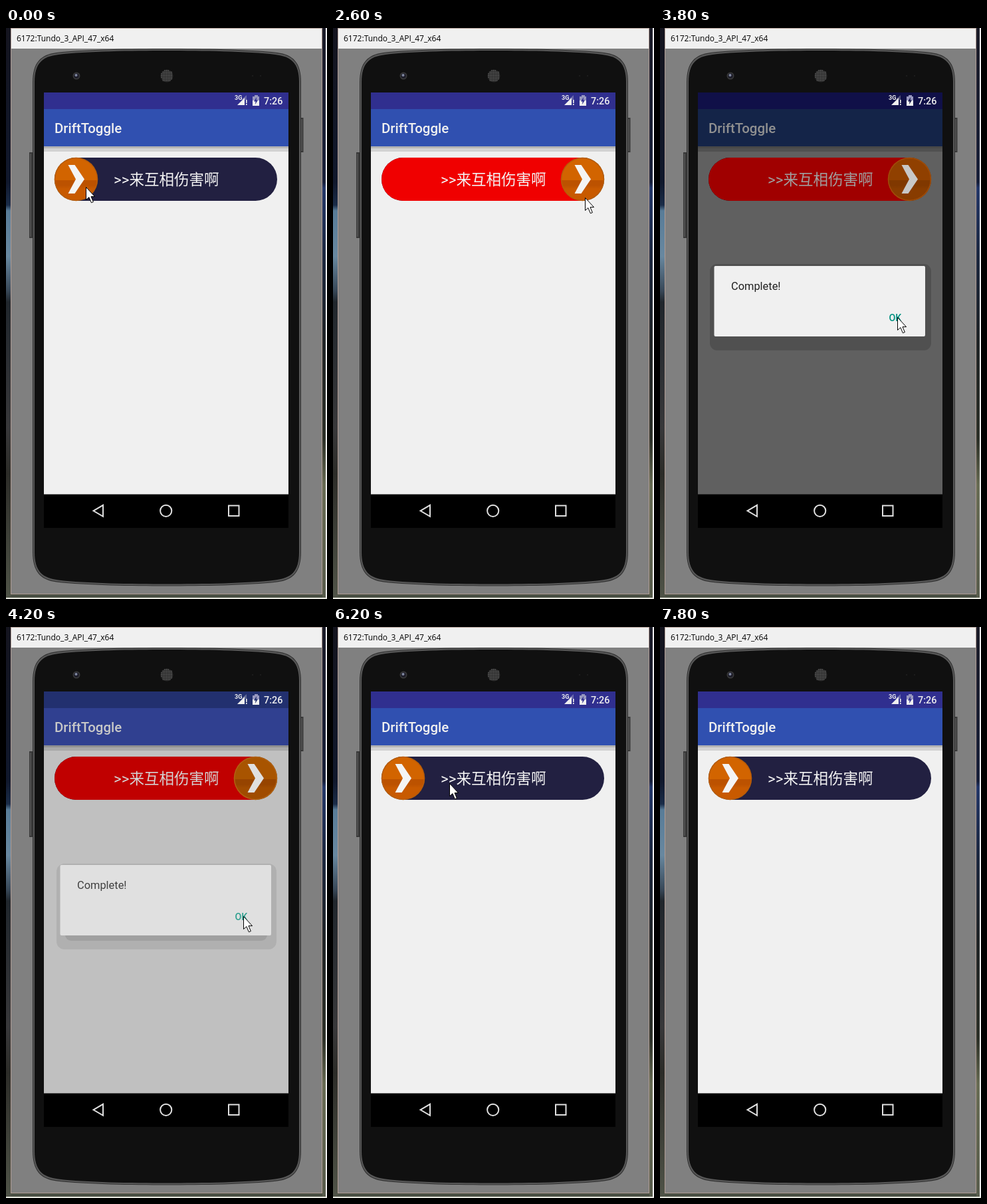
Write an HTML page with a canvas that moves like this. It is 483x859 px and loops after 8 s.

```html
<!DOCTYPE html>
<html lang="zh-CN">
<head>
<meta charset="utf-8">
<style>
html, body { margin: 0; width: 100%; height: 100%; overflow: hidden; background: #808080; }
canvas { display: block; width: 483px; height: 859px; }
</style>
</head>
<body>
<canvas id="stage" width="483" height="859"></canvas>
<script>
const ctx = document.getElementById('stage').getContext('2d');
const LOOP = 8000, STEP = 200;
const KNOB_R = 33, HOME = 105.5, END = 375.5, MID_Y = 227.5;

// Colours for the plain screen, the half dimmed one and the dimmed one
const THEMES = [
  { status: '#302f8f', bar: '#3050b0', title: '#f0f0f0', edge: '#b4b4b4', shade: '#d2d2d2', bg: '#f0f0f0',
    pill: '#222041', fill: '#f00000', label: '#f4f4f4', knob: ['#d26400', '#c85a00', '#bc5200'], rim: '#b85c08', arrow: '#f4f4f4' },
  { status: '#22306f', bar: '#304090', title: '#c8c8c8', edge: '#909090', shade: '#a8a8a8', bg: '#c0c0c0',
    pill: '#1a1834', fill: '#c00000', label: '#d4d4d4', knob: ['#a85400', '#a04c00', '#964400'], rim: '#b06010', arrow: '#e0e0e0',
    card: '#e0e0e0', halo: '#b0b0b0', text: '#404040', ok: '#30a090' },
  { status: '#101048', bar: '#142448', title: '#909090', edge: '#484848', shade: '#505050', bg: '#606060',
    pill: '#0e0c1a', fill: '#a00000', label: '#a0a0a0', knob: ['#904000', '#883c00', '#803800'], rim: '#a04c08', arrow: '#c8c8c8',
    card: '#f0f0f0', halo: '#505050', text: '#202020', ok: '#009080' }
];

// Rows of time, then values
const POINTER = [
  [0, 120, 239], [400, 215, 287], [600, 250, 272], [1200, 114, 228], [1400, 130, 229],
  [1800, 244, 229], [2200, 372, 233], [2400, 388, 236], [2800, 370, 273], [3200, 366, 360],
  [3600, 361, 430], [3800, 357, 435], [4200, 357, 435], [4800, 133, 230], [5200, 240, 233],
  [5600, 350, 235], [5800, 350, 235], [6200, 175, 235], [6400, 215, 237], [6800, 327, 330], [7600, 35, 644]
];
const KNOB = [
  [0, HOME], [1400, HOME], [1800, 216], [2200, 348], [2400, END], [4200, END], [4400, HOME],
  [4800, HOME], [5200, 189], [5600, 300], [5800, 300], [6200, HOME]
];

function track(keys, t) {
  const next = keys.findIndex(k => k[0] > t);
  if (next < 0) return keys[keys.length - 1].slice(1);
  const a = keys[next - 1], b = keys[next];
  const p = (t - a[0]) / (b[0] - a[0]);
  return a.slice(1).map((v, i) => v + (b[i + 1] - v) * p);
}

function dimLevel(t) {
  if (t < 2800 || t >= 4400) return 0;
  return t < 3000 || t >= 4200 ? 1 : 2;
}

function rect(x, y, w, h, color) {
  ctx.fillStyle = color;
  ctx.fillRect(x, y, w, h);
}

function round(x, y, w, h, r, color) {
  ctx.beginPath();
  ctx.roundRect(x, y, w, h, r);
  ctx.fillStyle = color;
  ctx.fill();
}

function disc(x, y, r, color) {
  ctx.beginPath();
  ctx.arc(x, y, r, 0, Math.PI * 2);
  ctx.fillStyle = color;
  ctx.fill();
}

function poly(points, dx = 0, dy = 0) {
  ctx.beginPath();
  points.forEach(([x, y]) => ctx.lineTo(x + dx, y + dy));
  ctx.closePath();
}

function text(str, x, y, font, color) {
  ctx.font = font;
  ctx.fillStyle = color;
  ctx.fillText(str, x, y);
}

function gradient(y0, y1, stops) {
  const g = ctx.createLinearGradient(0, y0, 0, y1);
  stops.forEach(([p, c]) => g.addColorStop(p, c));
  return g;
}

function drawDesktop() {
  rect(0, 0, 483, 859, '#4a5044');
  rect(0, 0, 8, 859, gradient(0, 859, [
    [0, '#14141e'], [0.27, '#10182c'], [0.31, '#1a2c48'], [0.32, '#587c98'], [0.4, '#6888a0'],
    [0.46, '#384858'], [0.48, '#20262c'], [0.7, '#38383a'], [0.78, '#2c2c28'], [1, '#505448']]));
  rect(476, 0, 5, 859, gradient(0, 859, [
    [0, '#1c1c28'], [0.27, '#18203a'], [0.28, '#24386a'], [0.4, '#1c2840'],
    [0.55, '#202426'], [0.72, '#2c3028'], [0.8, '#686c54'], [1, '#585c4c']]));
  rect(481, 0, 2, 859, '#f0f0f0');
  rect(0, 857, 483, 2, '#e8e8e0');
}

function drawWindow() {
  rect(7, 0, 469, 852, '#b09c94');
  rect(8, 1, 467, 30, '#f0f0f0');
  rect(8, 31, 467, 820, '#808080');
  text('6172:Tundo_3_API_47_x64', 16, 20, '12px "Open Sans", sans-serif', '#000');
}

function phonePath(inset) {
  const l = 40 + inset, r = 444 - inset, t = 31 + inset, b = 839.5 - inset;
  ctx.beginPath();
  ctx.moveTo(l, 82);
  ctx.bezierCurveTo(l, 52, l + 12, t + 9, l + 36, t + 6);
  ctx.bezierCurveTo(120, t + 1, 190, t, 242, t);
  ctx.bezierCurveTo(294, t, 364, t + 1, r - 36, t + 6);
  ctx.bezierCurveTo(r - 12, t + 9, r, 52, r, 82);
  ctx.lineTo(r, 788);
  ctx.bezierCurveTo(r, 818, r - 12, b - 9, r - 36, b - 6);
  ctx.bezierCurveTo(364, b - 1, 294, b, 242, b);
  ctx.bezierCurveTo(190, b, 120, b - 1, l + 36, b - 6);
  ctx.bezierCurveTo(l + 12, b - 9, l, 818, l, 788);
  ctx.closePath();
}

function drawPhone() {
  rect(35, 187, 6, 129, '#383838');
  rect(36, 189, 2, 125, '#505050');
  rect(442, 135, 5.5, 52, '#383838');
  rect(444, 137, 2, 48, '#505050');
  [[0, '#303030'], [1, '#585858'], [3, '#101010']].forEach(([inset, color]) => {
    phonePath(inset);
    ctx.fillStyle = color;
    ctx.fill();
  });

  disc(106, 72, 5.5, '#383838');
  disc(106, 72, 3.8, '#1c1c28');
  disc(105.5, 71, 2, '#8088a0');

  disc(242, 72, 9.5, '#282828');
  for (let y = -8; y <= 8; y += 2.5)
    for (let x = -8; x <= 8; x += 2.5)
      if (Math.hypot(x, y) < 9) disc(242 + x, 72 + y, 0.8, '#707070');

  rect(370, 71, 2, 2, '#1c1c1c');
  rect(382, 71, 2, 2, '#1c1c1c');
}

function drawStatus(th) {
  rect(57, 97, 368, 25, th.status);
  text('3G', 344, 108, '700 9px Roboto, sans-serif', '#f0f0f0');
  poly([[348, 116], [359, 105], [359, 116]]);
  ctx.fillStyle = '#f0f0f0';
  ctx.fill();
  poly([[354, 108], [362, 101], [362, 108]]);
  ctx.fillStyle = 'rgba(240,240,240,.3)';
  ctx.fill();
  rect(361, 108, 1.6, 5, '#f0f0f0');
  rect(361, 114, 1.6, 2, '#f0f0f0');

  rect(374, 101, 5, 2, '#9898c0');
  rect(371, 103, 10, 6, '#9898c0');
  rect(371, 109, 10, 8, '#f0f0f0');
  poly([[377, 104], [373, 110.5], [375.6, 110.5], [375, 115], [379, 108.5], [376.6, 108.5]]);
  ctx.fillStyle = th.status;
  ctx.fill();
  text('7:26', 388, 115, '500 14.4px Roboto, sans-serif', '#f0f0f0');
}

function drawScreen(th) {
  rect(57, 97, 368, 655, th.bg);
  drawStatus(th);
  rect(57, 122, 368, 56, th.bar);
  text('DriftToggle', 73, 157.5, '500 20.44px Roboto, sans-serif', th.title);
  rect(57, 178, 368, 3, th.edge);
  rect(57, 181, 368, 5, th.shade);

  rect(57, 701.5, 368, 50.5, '#000');
  ctx.strokeStyle = '#e0e0e0';
  ctx.lineWidth = 2;
  poly([[131.5, 726.3], [146, 717.8], [146, 734.8]]);
  ctx.stroke();
  ctx.beginPath();
  ctx.arc(240.7, 726.3, 8.6, 0, Math.PI * 2);
  ctx.stroke();
  ctx.strokeRect(335, 718.5, 15.5, 15.5);
}

function drawSlider(th, knob) {
  round(73, 195, 335, 65, 32.5, th.pill);
  if (knob > HOME) {
    ctx.save();
    ctx.beginPath();
    ctx.rect(73, 195, knob - 73, 65);
    ctx.clip();
    round(73, 195, 335, 65, 32.5, th.fill);
    ctx.restore();
  }
  text('>>来互相伤害啊', 162, 236, '22.5px Roboto, "Noto Sans CJK SC", "Noto Sans CJK", sans-serif', th.label);

  const [top, mid, low] = th.knob;
  disc(knob, MID_Y, KNOB_R - 0.2, th.rim);
  disc(knob, MID_Y, KNOB_R - 1.8,
    gradient(MID_Y - KNOB_R, MID_Y + KNOB_R, [[0, top], [0.52, top], [0.53, low], [0.64, low], [0.72, mid], [1, mid]]));
  poly([[-12, -21.5], [-2, -21.5], [12.5, 0], [-2, 21.5], [-12, 21.5], [-0.5, 0]], knob, MID_Y);
  ctx.fillStyle = th.arrow;
  ctx.fill();
}

function drawDialog(th, level) {
  if (level === 1) {
    round(76, 356, 331, 129, 12, th.halo);
    round(89, 440, 304, 32, 9, '#a0a0a0');
  } else {
    round(75, 355, 333, 130, 11, th.halo);
  }
  round(81.5, 358, 317.5, 106, 2, th.card);
  text('Complete!', 107, 394, '16.4px Roboto, sans-serif', th.text);
  text('OK', 344.5, 441, '500 14.3px Roboto, sans-serif', th.ok);
}

function drawPointer(x, y) {
  poly([[0.5, 0.5], [0.5, 19.5], [4.9, 15.6], [8.4, 23.8], [11.4, 22.6], [8, 14.6], [13.6, 14.6]], x, y);
  ctx.fillStyle = '#fff';
  ctx.fill();
  ctx.strokeStyle = '#000';
  ctx.lineWidth = 1;
  ctx.stroke();
}

function render(now) {
  const t = Math.floor((now % LOOP) / STEP) * STEP;
  const level = dimLevel(t), th = THEMES[level];
  drawDesktop();
  drawWindow();
  drawPhone();
  drawScreen(th);
  drawSlider(th, track(KNOB, t)[0]);
  if (level) drawDialog(th, level);
  if (t < 7800) drawPointer(...track(POINTER, t).map(Math.round));
}

let start;
function tick(now) {
  start ??= now;
  render(now - start);
  requestAnimationFrame(tick);
}
render(0);
requestAnimationFrame(tick);
</script>
</body>
</html>
```
